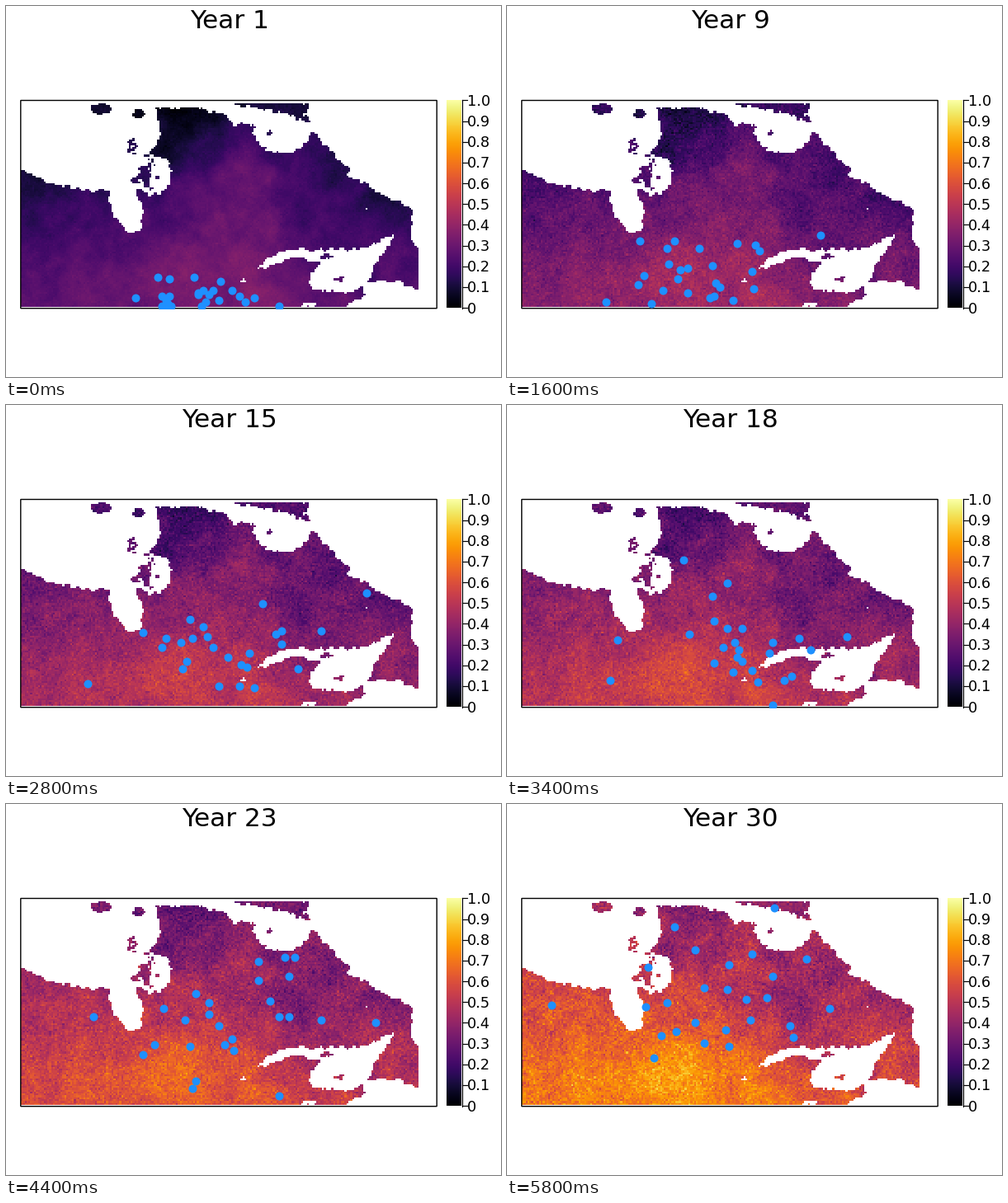
These frames come from a looping animation (600x450 px, 6000 ms). A matplotlib script:

```python
import numpy as np
import matplotlib.pyplot as plt
from matplotlib.animation import FuncAnimation
from matplotlib.patches import Rectangle
from matplotlib.path import Path

YEARS = 30
COLS, ROWS = 210, 107
LEFT, RIGHT, TOP, BOTTOM = 18, 500, 118.1, 364.8

plt.rcParams["font.family"] = "DejaVu Sans"
rng = np.random.default_rng(4)

# Rough outlines of open water; noise makes the shores ragged
BAY = [(10, 110), (17, 199), (50, 213), (88, 223), (126, 224), (124, 237), (132, 255),
       (150, 278), (164, 272), (167, 245), (158, 227), (160, 195), (172, 179),
       (187, 160), (181, 124), (231, 123), (262, 130), (274, 143), (303, 144),
       (367, 149), (378, 110)]
EAST = [(366, 110), (367, 149), (402, 183), (420, 208), (450, 224), (494, 247),
        (490, 278), (505, 302), (505, 110)]
GULF = [(303, 321), (318, 306), (345, 296), (438, 294), (455, 281), (474, 277),
        (449, 310), (437, 338), (413, 348), (376, 344), (366, 335), (380, 312),
        (355, 304), (325, 313)]
OCEAN = [(404, 370), (436, 350), (430, 336), (480, 333), (481, 341), (505, 341),
         (505, 370)]
STRIP = [(275, 117), (372, 117), (363, 129), (369, 142), (330, 128), (277, 121)]

# Ovals: centre and radii
BASINS = [(178, 205, 23, 24), (334, 155, 34, 23), (368, 362, 10, 2.5),
          (288, 333, 2, 2), (440, 245, 1.6, 2)]
ISLES = [(116, 125, 14, 6), (160, 131, 7.5, 5), (320, 154, 4.5, 3),
         (388, 305, 8, 3.5), (404, 330, 7, 2.5)]
SPECKS = [(168, 207, 11, 11), (151, 171, 4, 9), (172, 191, 8, 2)]

# Warm and cool spots: centre, radius, strength at start and end
SPOTS = [(215, 140, 35, -.09, -.09), (280, 215, 52, .11, 0), (190, 320, 50, .06, .12),
         (300, 345, 45, .08, .08), (345, 250, 50, 0, -.10), (470, 240, 40, -.05, -.05),
         (30, 205, 38, -.05, 0)]

xs = LEFT + (np.arange(COLS) + .5) * (RIGHT - LEFT) / COLS
ys = TOP + (np.arange(ROWS) + .5) * (BOTTOM - TOP) / ROWS
gx, gy = np.meshgrid(xs, ys)


def smooth_noise(sigma):
    """Unit-variance noise with blobs about sigma cells wide."""
    fx, fy = np.fft.fftfreq(COLS), np.fft.fftfreq(ROWS)[:, None]
    low = np.exp(-2 * (np.pi * sigma) ** 2 * (fx ** 2 + fy ** 2))
    field = np.fft.ifft2(np.fft.fft2(rng.normal(size=(ROWS, COLS))) * low).real
    return field / field.std()


def inside(outlines, ovals, ragged):
    x = gx + ragged * smooth_noise(.8)
    y = gy + ragged * smooth_noise(.8)
    hit = np.zeros((ROWS, COLS), bool)
    for outline in outlines:
        pts = np.column_stack([x.ravel(), y.ravel()])
        hit |= Path(outline).contains_points(pts).reshape(hit.shape)
    for cx, cy, rx, ry in ovals:
        hit |= ((x - cx) / rx) ** 2 + ((y - cy) / ry) ** 2 < 1
    return hit


water = inside([BAY, EAST, GULF, OCEAN], BASINS, 1.1)
sea = water & ~inside([STRIP], ISLES, 1.3) & ~inside([], SPECKS, 3.5)
west = 1 - (gx - LEFT) / (RIGHT - LEFT)
south = (gy - TOP) / (BOTTOM - TOP)
blotches = .016 * smooth_noise(4) + .009 * smooth_noise(1.6)
grain = rng.normal(size=(ROWS, COLS))


def suitability(year):
    p = (year - 1) / (YEARS - 1)
    v = .09 + .27 * p + (.18 + .06 * p) * south + .12 * p ** 2 * west
    for x, y, radius, start, end in SPOTS:
        d2 = (gx - x) ** 2 + (gy - y) ** 2
        v = v + (start + (end - start) * p) * np.exp(-d2 / (2 * radius ** 2))
    fresh = np.random.default_rng(100 + year).normal(size=v.shape)
    v = v + blotches * (1 + .5 * p) + (.008 + .038 * p ** .5) * (.6 * grain + .8 * fresh)
    return np.ma.masked_array(np.clip(v, 0, 1), sea)


def sites(year):
    """Colonies start in the south and spread north and sideways."""
    r = np.random.default_rng(700 + year)
    p = (year - 1) / (YEARS - 1)
    cx, cy = 235 + 60 * p, 365 - 130 * p
    wx, wy = 55 + 45 * p, 19 + 32 * p ** .6
    w = np.exp(-((gx - cx) / wx) ** 2 / 2 - ((gy - cy) / wy) ** 2 / 2) * ~sea
    cells = r.choice(w.size, 26, replace=False, p=(w / w.sum()).ravel())
    return np.column_stack([gx.ravel()[cells], gy.ravel()[cells]])


fig = plt.figure(figsize=(6, 4.5), dpi=100, facecolor="white")
ax = fig.add_axes([0, 0, 1, 1])
px = 72 / fig.dpi

cmap = plt.get_cmap("inferno").copy()
cmap.set_bad("white")
style = dict(cmap=cmap, vmin=0, vmax=1, interpolation="nearest", aspect="auto")
land = ax.imshow(suitability(1), extent=(LEFT, RIGHT, BOTTOM, TOP), **style)
ax.imshow(np.linspace(1, 0, 256)[:, None], extent=(534, 552, 366, 114), **style)

box = dict(xy=(17.8, 114.5), width=504.4, height=252.2)
ax.add_patch(Rectangle(**box, fill=False, ec="black", lw=1.4 * px, snap=False, zorder=3))
dots = ax.scatter([], [], s=(10 * px) ** 2, c="dodgerblue", linewidths=0, zorder=4)
dots.set_clip_path(Rectangle(**box, transform=ax.transData))

ax.plot([552.5, 552.5], [114, 366.5], color="black", lw=1.2 * px)
for k in range(11):
    y = 366.2 - 25.18 * k
    ax.plot([552.5, 558.5], [y, y], color="black", lw=1.2 * px)
    ax.text(558.8, y + 6.4, f"{k / 10:.1f}" if k else "0", size=17.8 * px, va="baseline")
title = ax.text(271, 27, "", size=31.2 * px, ha="center", va="baseline")

ax.set_xlim(0, 600)
ax.set_ylim(450, 0)
ax.axis("off")


def draw(i):
    year = i + 1
    land.set_data(suitability(year))
    dots.set_offsets(sites(year))
    title.set_text(f"Year {year}")
    return land, dots, title


anim = FuncAnimation(fig, draw, frames=YEARS, interval=200, repeat=True, repeat_delay=0)
plt.show()
```
